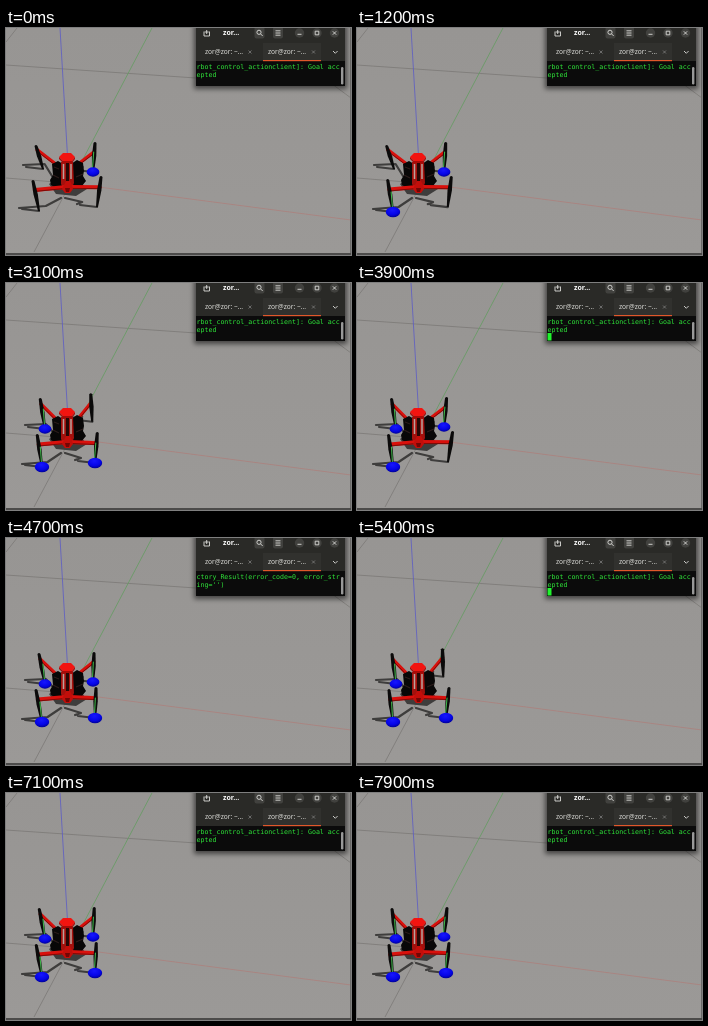
Write an HTML page that moves like this. It is 345 px wide and 227 px high and loops after 8 s.

```html
<!DOCTYPE html>
<html lang="en">
<head>
<meta charset="utf-8">
<title>Walking robot simulation</title>
<style>
html, body { margin: 0; width: 100%; height: 100%; overflow: hidden; background: #999795; }
svg { display: block; width: 100%; height: 100%; }
.ui { font: 6.6px "Noto Sans", "Open Sans", sans-serif; fill: #dcdcd8; }
.title { font-size: 7px; font-weight: 700; fill: #fff; }
.mono { font: 6.62px "DejaVu Sans Mono", monospace; fill: #2fe83a; white-space: pre; }
.icon { fill: none; stroke: #dcdcd8; stroke-width: .9; }
</style>
</head>
<body>
<svg viewBox="0 0 345 227" preserveAspectRatio="none">
  <defs>
    <linearGradient id="ground" x2="0" y2="1">
      <stop stop-color="#979593"/><stop offset="1" stop-color="#9b9997"/>
    </linearGradient>
    <radialGradient id="ballFill" cx=".45" cy=".3" r=".75">
      <stop stop-color="#1616ff"/><stop offset=".6" stop-color="#0505e6"/><stop offset="1" stop-color="#000086"/>
    </radialGradient>
    <filter id="blur" x="-10%" y="-20%" width="120%" height="140%"><feGaussianBlur stdDeviation="2.4"/></filter>
  </defs>

  <rect width="345" height="227" fill="url(#ground)"/>
  <g fill="none" stroke-width=".8">
    <path d="M0 150L62 155M62 160L28 224M11 0L0 14M0 37L190 50M326 56L345 70" stroke="#7b7977"/>
    <path d="M62 155L345 192" stroke="#ad817d"/>
    <path d="M146 0L66 152" stroke="#649c61"/>
    <path d="M54 0L61.5 128" stroke="#5c5cc6"/>
  </g>
  <path d="M344.5 0V227" stroke="#6b6a69"/>
  <rect y="225" width="345" height="2" fill="#4c4b4a"/>

  <g id="shadows" fill="none" stroke="#3e3d3c" stroke-linecap="round" stroke-linejoin="round" stroke-width="2.2"></g>
  <path d="M43 156l9-6 20 1 9 10-11 7-20-2z" fill="#3e3d3c"/>
  <g id="backLegs"></g>

  <g id="body">
    <path d="M46 136l6-3 5 3 1 23-6 2-7-4-1-5 3-5zM65 136l6-4 6 3 1 8-1 5 3 5-5 6-10 2z" fill="#080707"/>
    <path d="M47 147l6 3M70 149l7-3M48 139l5 2" stroke="#2b1c1b" stroke-width="1.1"/>
    <path d="M55 134h12l1 21-4 9h-5l-4-8z" fill="#a3110d"/>
    <path d="M60 135h3v21h-3z" fill="#260806"/>
    <path d="M57.5 136v15M65 136v15" stroke="#bba29d" stroke-width="1.5"/>
    <path d="M53 129l4-4h8l4 4-3 4H57z" fill="#f21410"/>
    <path d="M53 129l4 4h9l3-4v2l-3 4h-9l-4-4z" fill="#a70b08"/>
  </g>
  <g id="frontLegs"></g>
  <path d="M58 157l2-4h4l2 4 1 4-3 4h-5l-3-4z" fill="#c20e0a"/>
  <path d="M59 160h5l-1 4h-3z" fill="#700705"/>

  <g id="terminal">
    <rect x="188" y="-4" width="153" height="65" opacity=".55" filter="url(#blur)"/>
    <rect x="190" width="149" height="58" fill="#0b0b0b"/>
    <rect x="190" width="149" height="33" fill="#2a2a27"/>
    <rect x="257" y="15" width="58" height="17" fill="#31312e"/>
    <rect x="257" y="32" width="58" height="1.2" fill="#e0572b"/>
    <g fill="#41413e">
      <rect x="248.5" y="-1" width="10" height="11.5" rx="2"/>
      <rect x="267" y="-1" width="10" height="11.5" rx="2"/>
      <circle cx="293.5" cy="5" r="4.7"/><circle cx="311" cy="5" r="4.7"/><circle cx="328.5" cy="5" r="4.7"/>
    </g>
    <text class="ui title" x="217" y="7.3">zor...</text>
    <text class="ui" x="199" y="26.3">zor@zor: ~...</text>
    <text class="ui" x="262" y="26.3">zor@zor: ~...</text>
    <g class="icon">
      <path d="M198 3.5v4.5h5.5v-4.5M200.7 2v4M198.7 4h4"/>
      <circle cx="253" cy="4.3" r="2.1"/><path d="M254.7 6l2 2"/>
      <path d="M269.5 2.8h5M269.5 5h5M269.5 7.2h5"/>
      <path d="M291.5 6.3h4M309.2 3.2h3.6v3.6h-3.6zM326.8 3.3l3.4 3.4m0-3.4l-3.4 3.4"/>
      <path d="M327 23l2.3 2.3 2.3-2.3"/>
      <path d="M242.5 22.5l3 3m0-3l-3 3M306 22.5l3 3m0-3l-3 3" stroke="#888" stroke-width=".7"/>
    </g>
    <text id="line1" class="mono" x="190.5" y="40.7"></text>
    <text id="line2" class="mono" x="190.5" y="48.6"></text>
    <rect id="cursor" x="190.5" y="50" width="4" height="7.5" fill="#20f32d"/>
    <rect x="335" y="39" width="2.4" height="17.5" rx="1.2" fill="#999"/>
  </g>
</svg>
<script>
const LOOP = 8000, STEP = 100;
const GAIT = 1260, REPORT = 900, BLINK = 1200;

// Points are [x, y] at rest; kneeMove and footMove are the offsets at full lift.
// A leg leaves the ground at "lift" ms of the gait and stays up for "air" ms.
const legs = [
  { hip: [51, 137], knee: [34, 116], foot: [39, 146], kneeMove: [-4, 2], footMove: [-2, -5],
    joint: .17, lift: -80, air: 170 },
  { hip: [71, 137], knee: [89, 115], foot: [87, 144], kneeMove: [-6, -5], footMove: [-1, -7],
    joint: .3, lift: 345, air: 250 },
  { hip: [60, 159], knee: [31, 152], foot: [36, 184], kneeMove: [-4, 1], footMove: [-3, -1],
    joint: .3, lift: -40, air: 130, front: true },
  { hip: [64, 159], knee: [91, 150], foot: [89, 180], kneeMove: [4, -1], footMove: [2, -1],
    joint: .34, lift: -80, air: 280, front: true }
];

const $ = id => document.getElementById(id);
const mix = (a, b, k) => a + (b - a) * k;
const between = (p, q, k) => [mix(p[0], q[0], k), mix(p[1], q[1], k)];
const move = (p, by, k) => [p[0] + by[0] * k, p[1] + by[1] * k];
const wrap = (t, period) => ((t % period) + period) % period;

function set(el, attrs) {
  for (const name in attrs) el.setAttribute(name, attrs[name]);
  return el;
}
function add(parent, tag, attrs) {
  const el = document.createElementNS("http://www.w3.org/2000/svg", tag);
  return parent.appendChild(set(el, attrs));
}
const show = (el, on) => set(el, { visibility: on ? "visible" : "hidden" });

for (const leg of legs) {
  const layer = $(leg.front ? "frontLegs" : "backLegs");
  const stroke = (color, width) => add(layer, "path", {
    fill: "none", stroke: color, "stroke-width": width, "stroke-linecap": "round"
  });
  leg.size = leg.front ? 7.2 : 6.4;
  leg.shadow = add($("shadows"), "path", {});
  leg.femur = stroke("#d9100c", leg.front ? 4 : 3.4);
  leg.femurShade = stroke("#7d0a07", 1);
  leg.shin = add(layer, "path", { fill: "#0b0a0a" });
  leg.force = stroke("#3fb24a", 1.1);
  leg.ball = add(layer, "ellipse", { rx: leg.size, ry: leg.size * .73, fill: "url(#ballFill)" });
}

function drawLeg(leg, t) {
  const swing = wrap(t - leg.lift, GAIT) / leg.air;
  const down = swing >= 1;
  const raise = down ? 0 : Math.min(1, 4 * Math.sin(Math.PI * swing));
  const sway = Math.sin(2 * Math.PI * t / GAIT);

  const knee = move(leg.knee, leg.kneeMove, raise);
  knee[0] += sway;
  const foot = move(leg.foot, leg.footMove, raise);
  const joint = between(knee, foot, leg.joint);
  const [kx, ky] = knee, [fx, fy] = foot, [hx, hy] = leg.hip;
  const [mx, my] = between(knee, foot, .45);

  set(leg.femur, { d: `M${hx} ${hy}L${joint}` });
  set(leg.femurShade, { d: `M${hx} ${hy + 1.4}L${joint[0]} ${joint[1] + 1.4}` });
  set(leg.shin, {
    d: `M${kx - 1.5} ${ky}Q${kx} ${ky - 2} ${kx + 1.5} ${ky}L${mx + 2.2} ${my}` +
       `L${fx + 1} ${fy}H${fx - 1}L${mx - 2.2} ${my}Z`
  });
  set(leg.force, { d: `M${fx - .5} ${fy - 4}L${mix(fx, kx, .35)} ${fy - 20}` });
  set(leg.ball, { cx: fx, cy: fy });
  show(leg.force, down);
  show(leg.ball, down);

  const bend = [mix(hx, fx, .6) - 4, fy - 5];
  const tip = [fx - 20, fy - (leg.front ? 3 : 4)];
  set(leg.shadow, { d: `M${hx - 5} ${hy + 11}L${bend}L${tip}M${fx} ${fy}L${fx - 17} ${fy - 2}` });
}

function drawTerminal(t) {
  const report = t % REPORT, blink = t % BLINK;
  const done = report >= 100 && report < 300;
  $("line1").textContent = done ? "ctory_Result(error_code=0, error_str" : "rbot_control_actionclient]: Goal acc";
  $("line2").textContent = done ? "ing='')" : "epted";
  show($("cursor"), blink >= 100 && blink < 700);
}

function render(t) {
  for (const leg of legs) drawLeg(leg, t);
  drawTerminal(t);
}

const start = performance.now();
function tick() {
  const t = (performance.now() - start) % LOOP;
  render(Math.floor(t / STEP) * STEP);
  requestAnimationFrame(tick);
}
tick();
</script>
</body>
</html>
```
